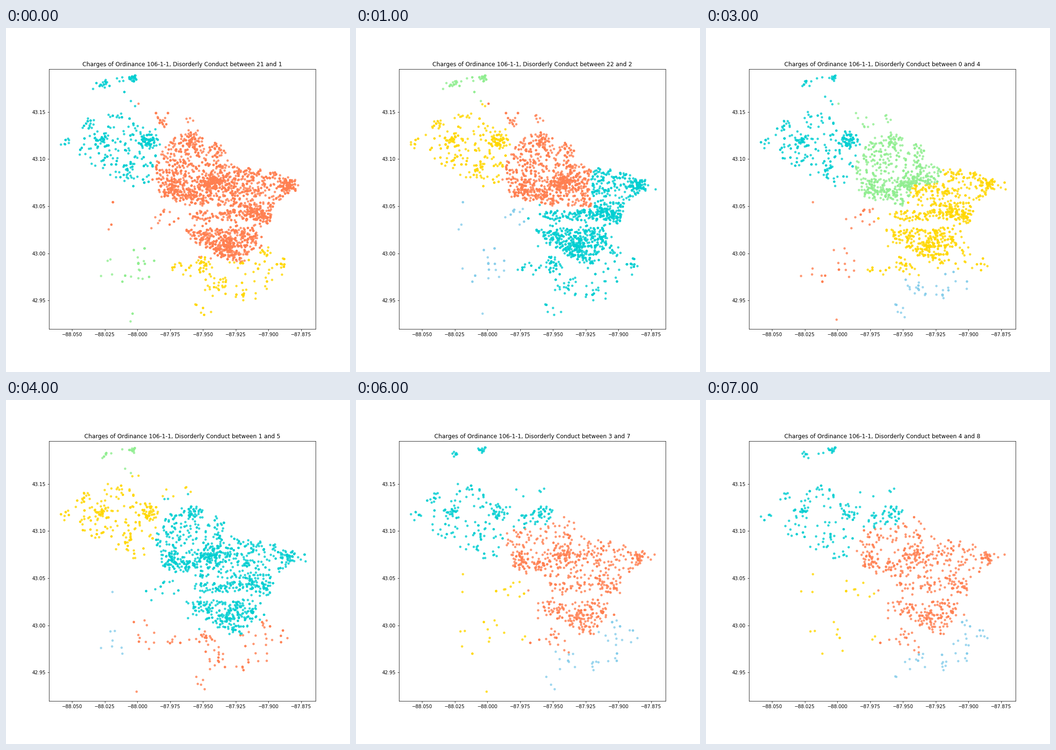
Recreate the animation shown at these times as a matplotlib script. Size 720 by 720 pixels, loop 8000 ms.

```python
import numpy as np
import matplotlib.pyplot as plt
from matplotlib.animation import FuncAnimation
from matplotlib.colors import to_rgba_array
from matplotlib.path import Path

FRAMES = 8
WINDOW = 4  # hours shown at once
HOURS = np.arange(FRAMES + WINDOW - 1)
COLORS = {"T": "darkturquoise", "C": "coral", "G": "lightgreen",
          "Y": "gold", "S": "skyblue", "M": "#8fe6cd"}

# Each area: hourly fade, charges in the first window, outline, and
# hotspots as x, y, spread, charges
AREAS = [
    # far north
    (0.84, 22, [(152, 132), (192, 104), (270, 98), (272, 122)],
     [(204, 114, 4, 20), (267, 106, 4, 16), (263, 150, 12, 8)]),
    # north west
    (0.89, 240,
     [(142, 198), (220, 172), (265, 185), (322, 230), (310, 325), (262, 332),
      (205, 305), (150, 268)],
     [(170, 202, 6, 20), (198, 234, 7, 45), (298, 235, 11, 75),
      (254, 295, 9, 24), (124, 241, 7, 10)]),
    # centre
    (0.825, 1130,
     [(372, 215), (405, 220), (415, 255), (445, 235), (475, 290), (555, 298),
      (605, 315), (604, 350), (570, 364), (548, 415), (530, 375), (380, 372),
      (322, 350), (310, 290), (335, 245)],
     [(388, 188, 6, 10), (328, 194, 10, 22), (387, 234, 11, 60),
      (350, 338, 12, 110), (385, 345, 10, 70), (426, 322, 12, 150),
      (462, 328, 15, 110), (589, 331, 8, 85), (615, 328, 8, 8)]),
    # main street
    (0.825, 220, [(382, 384), (545, 376), (552, 405), (385, 400)],
     [(515, 384, 6, 60), (540, 399, 8, 40)]),
    # south of the valley
    (0.825, 400,
     [(375, 422), (527, 422), (525, 455), (498, 495), (455, 480), (380, 440)],
     [(463, 458, 13, 130), (500, 430, 18, 60), (420, 428, 18, 60)]),
    # south
    (0.85, 110,
     [(330, 490), (410, 478), (525, 465), (600, 487), (560, 545), (522, 570),
      (455, 562), (410, 520), (345, 522)],
     [(538, 468, 7, 24), (415, 495, 10, 40), (435, 545, 10, 16),
      (500, 554, 12, 18), (415, 594, 9, 10)]),
    # south west
    (0.93, 24, [(180, 505), (294, 443), (322, 462), (312, 535), (200, 535)],
     [(330, 400, 18, 18), (215, 395, 28, 5), (283, 500, 9, 8),
      (267, 610, 10, 1)]),
]

# Cluster colour in each window, with the sites whose surroundings share it
CLUSTERS = {
    "TGTTGGTT": [(230, 100)],
    "TYTTYSTT": [(230, 210), (285, 235), (260, 310)],
    "CCGGYSTT": [(345, 170)],
    "CCGGTSTT": [(360, 235)],
    "CCGGTCCC": [(365, 300), (450, 300), (345, 340), (400, 340)],
    "CCYYTCCC": [(455, 355)],
    "CTYYTCCC": [(530, 325), (385, 400), (455, 395), (530, 400), (385, 460),
                 (460, 470), (530, 435)],
    "YTYYCCCC": [(385, 500), (460, 510)],
    "YTYYCTYY": [(340, 500)],
    "YTYYCYSS": [(550, 480)],
    "YTSSCYSS": [(385, 550), (455, 550), (520, 550)],
    "CSCCTTYY": [(335, 400)],
    "CSCCSTYY": [(220, 400)],
    "GSCCSTYY": [(250, 505)],
    "GSCCCTYY": [(295, 490)],
    "GSCCCTYM": [(265, 600)],
}

rng = np.random.default_rng(106)


def inside(outline, size):
    """Random places within an outline."""
    low, high = np.min(outline, axis=0), np.max(outline, axis=0)
    spots = rng.uniform(low, high, (size * 6, 2))
    return spots[Path(outline).contains_points(spots)][:size]


def around(x, y, spread, size):
    """Random places in a soft, slightly flat blob."""
    offset = rng.uniform(-1, 1, (2, size, 2)).mean(axis=0)
    return (x, y) + offset * spread * (2.5, 2.0)


def charges(homes, count, fade):
    """Rows of x, y, hour; busy addresses recur."""
    share = fade ** HOURS
    share /= share[:WINDOW].sum()
    hour = np.repeat(HOURS, rng.poisson(count * share))
    pick = (len(homes) * rng.random(len(hour)) ** 1.4).astype(int)
    return np.column_stack([homes[pick], hour])


rows = []
for fade, count, outline, hotspots in AREAS:
    rows.append(charges(inside(outline, count + 5), count, fade))
    for x, y, spread, hits in hotspots:
        rows.append(charges(around(x, y, spread, hits + 2), hits, fade))
points = np.vstack(rows)

sites = np.vstack(list(CLUSTERS.values()))
histories = [h for h, group in CLUSTERS.items() for _ in group]
gaps = points[:, None, :2] - sites
nearest = (gaps ** 2).sum(axis=2).argmin(axis=1)

plt.rcParams["font.family"] = "DejaVu Sans"
plt.rcParams["text.kerning_factor"] = 6
fig = plt.figure(figsize=(10, 10), dpi=72, facecolor="white")
fig.subplots_adjust(left=0.125, right=0.9, bottom=0.125, top=0.88)
ax = fig.add_subplot()

# The plot works in stage pixels; ticks carry the map coordinates
ax.set_xlim(90, 648)
ax.set_ylim(630, 86.4)
ax.set_xticks(138.1 + 68.5 * np.arange(8),
              [f"\u2212{88.05 - 0.025 * i:.3f}" for i in range(8)])
ax.set_yticks(175.8 + 98.6 * np.arange(5),
              [f"{43.15 - 0.05 * i:.2f}" for i in range(5)])
dots = ax.scatter([], [], s=25, linewidths=0)
title = ax.set_title("", fontsize=12)


def draw(frame):
    hour = points[:, 2]
    shown = (frame <= hour) & (hour < frame + WINDOW)
    palette = to_rgba_array([COLORS[h[frame]] for h in histories], 0.8)
    dots.set_offsets(points[shown, :2])
    dots.set_facecolor(palette[nearest[shown]])
    start = (21 + frame) % 24
    title.set_text("Charges of Ordinance 106-1-1, Disorderly Conduct "
                   f"between {start} and {(start + WINDOW) % 24}")
    return dots, title


anim = FuncAnimation(fig, draw, frames=FRAMES, interval=1000, repeat=True)
plt.show()
```
